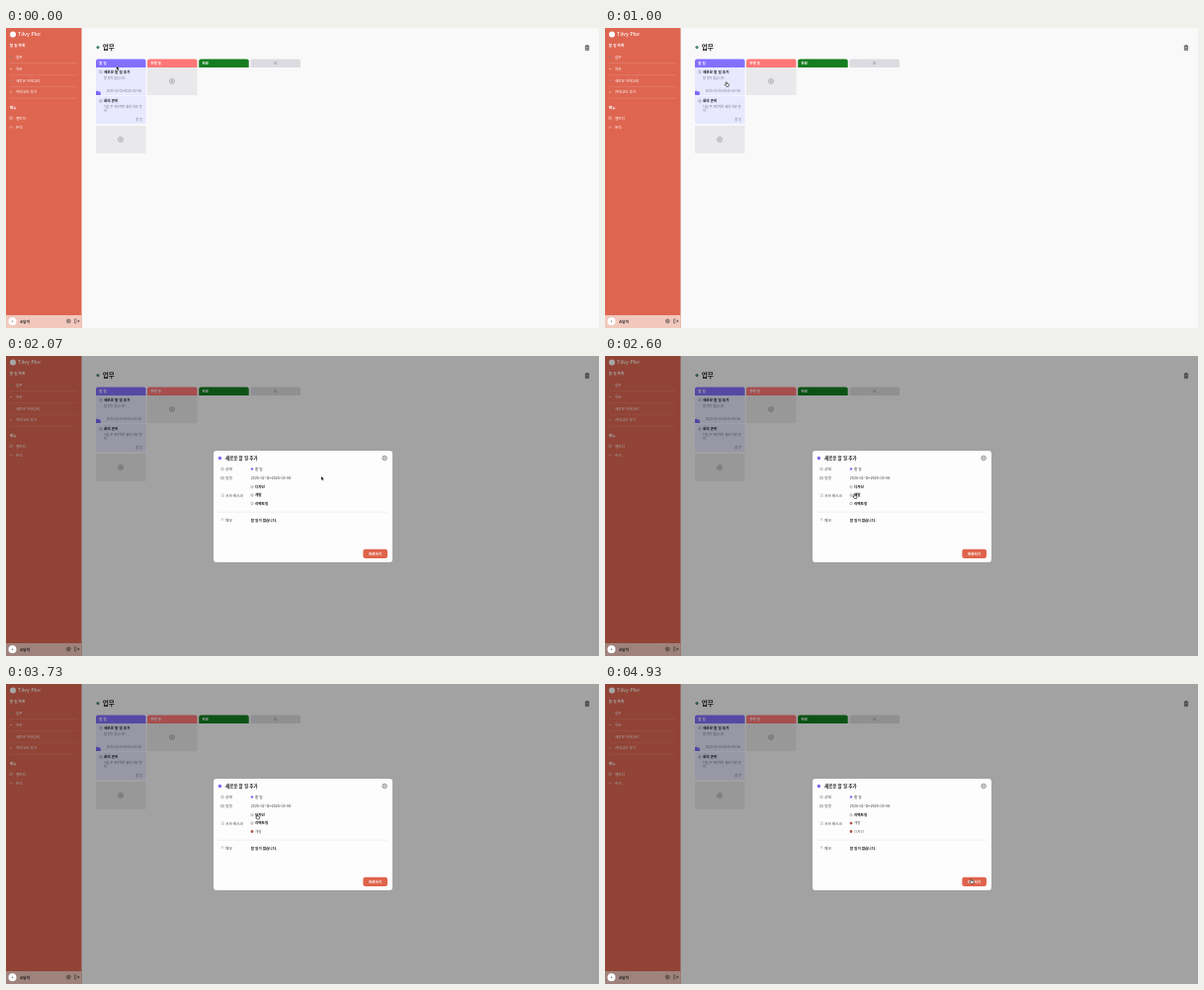
Write an HTML page that moves like this. It is 600x304 px and loops after 5000 ms.

```html
<!DOCTYPE html>
<html lang="ko">
<head>
<meta charset="utf-8">
<style>
html, body { margin: 0; width: 100%; height: 100%; overflow: hidden; }
svg {
  display: block; width: 600px; height: 304px;
  font-family: "Noto Sans CJK KR", "Noto Sans CJK", sans-serif;
}
text { white-space: pre; }
.latin { font-family: Inter, sans-serif; }
.ring { fill: none; stroke-width: .5; }
</style>
</head>
<body>
<svg id="stage" viewBox="0 0 600 304"></svg>
<script>
const stage = document.getElementById('stage');
const INK = '#1c1c20', GRAY = '#777780', LABEL = '#44444c', CORAL = '#e0644c', PURPLE = '#7c68fa';
const WHITE = '#fff', CARD = '#e8e8ff', TILE = '#e9e9eb';

const rect = (x, y, w, h, fill, r = 0) =>
  `<rect x="${x}" y="${y}" width="${w}" height="${h}" rx="${r}" fill="${fill}"/>`;
const dot = (x, y, r, fill) => `<circle cx="${x}" cy="${y}" r="${r}" fill="${fill}"/>`;
const ring = (x, y, r, color) => `<circle class="ring" cx="${x}" cy="${y}" r="${r}" stroke="${color}"/>`;
const path = (d, color, w = .5, fill = 'none') =>
  `<path d="${d}" fill="${fill}" stroke="${color}" stroke-width="${w}"/>`;
const text = (x, y, str, fill = INK, size = 3.65, weight = 500) =>
  `<text x="${x}" y="${y}" fill="${fill}" font-size="${size}" font-weight="${weight}">${str}</text>`;
const latin = (...args) => `<g class="latin">${text(...args)}</g>`;
const plus = (x, y, r, color) => ring(x, y, r, color) +
  path(`M${x - r / 2} ${y}h${r}M${x} ${y - r / 2}v${r}`, color);
const header = (x, color, label) =>
  path(`M${x} 40v-6.5q0-2 2-2h46.5q2 0 2 2v6.5z`, 'none', 0, color) +
  text(x + 3.3, 36.9, label, WHITE, 3.5, 700);
const addTile = (x, y) => rect(x, y, 50.5, 28, TILE, 1) + plus(x + 25, y + 14, 2.5, GRAY);

function sidebar() {
  const items = [['업무', 29.3, '#6f8a7a'], ['약속', 41.5, '#f3c4ba'], ['새로운 카테고리', 53.2, '#9a8a98'], ['카테고리 추가', 65]];
  return rect(0, 0, 76.5, 304, '#de6651') +
    dot(7, 6.5, 3, WHITE) + latin(12, 8.3, 'Tilvy Plor', WHITE, 5.2) +
    text(3.8, 19.2, '할 일 목록', WHITE, 3.65, 700) +
    items.map(([name, y, color]) =>
      (color ? dot(5, y, .8, color) : path(`M4.2 ${y}h1.6M5 ${y - .8}v1.6`, WHITE, .35)) +
      text(10, y + 1.4, name, WHITE) +
      path(`M4 ${y + 6.2}H72`, '#e8907f', .4)).join('') +
    text(3.8, 81.8, '메뉴', WHITE, 3.65, 700) +
    path('M3.8 90h2.6v2.6h-2.6zM3.8 91h2.6M3.8 101.5v-1.2M5 101.5v-2.2M6.2 101.5v-1.6', WHITE, .3) +
    text(10, 92.6, '캘린더', WHITE) + text(10, 101.7, '분석', WHITE) +
    rect(0, 291, 76.5, 13, '#f2c8bc') +
    text(14, 298.6, '소담이', INK, 3.65, 700) +
    ring(63.3, 297, 1.9, INK) + ring(63.3, 297, .7, INK) +
    path('M71.3 295h-1.6v4h1.6M71.2 297h3M73 295.8l1.2 1.2-1.2 1.2', INK);
}

function board() {
  return dot(93, 19.6, 1.6, '#4d8875') + text(97.8, 22.1, '업무', INK, 6.6, 700) +
    path('M585.8 18.4h4.4M587.2 18.2v-.8h1.6v.8M586.4 18.6v3.8h3.2v-3.8M587.5 19.4v2.2M588.5 19.4v2.2', INK, .6) +
    header(91, '#8470ff', '할 일') + header(143, '#ff7777', '진행 중') +
    header(195.2, '#147d20', '완료') + header(247.5, '#dcdce0', '') +
    plus(272.6, 35.6, 1.3, '#9a9aa2') +
    rect(91, 40, 50.5, 28.3, CARD) + rect(91, 69.3, 50.5, 28, CARD, 1) +
    ring(95.9, 44.5, 1.3, GRAY) + text(99, 45.9, '새로운 할 일 추가', INK, 3.65, 700) +
    text(99, 51.6, '할 일이 없습니다.', GRAY, 3.1) +
    latin(101.8, 64.9, '2025-02-12~2025-03-06', GRAY, 2.9, 400) +
    rect(91, 63.7, 2.5, 2, PURPLE, .5) + rect(91, 64.4, 4.8, 3.6, PURPLE, .5) +
    ring(95.9, 74, 1.3, GRAY) + text(99, 75.3, '회의 준비', INK, 3.65, 700) +
    text(99, 80.9, '다음 주 프로젝트 회의 자료 준', GRAY, 3.1) + text(99, 85.4, '비', GRAY, 3.1) +
    text(131.2, 94.2, '할 일', GRAY, 3.1) +
    addTile(91, 99) + addTile(143, 40);
}

function modal() {
  return rect(210, 96, 181, 113, '#fdfdfe', 3) +
    dot(216.4, 103.5, 1.7, PURPLE) + text(221.9, 105.1, '새로운 할 일 추가', INK, 4.5, 700) +
    ring(383.1, 103.4, 2.2, INK) + path('M382.3 102.6l1.6 1.6M383.9 102.6l-1.6 1.6', INK) +
    ring(219, 114.5, 1.3, GRAY) + text(222.1, 115.9, '상태', LABEL) +
    path('M217.6 122.4h2.8v2.7h-2.8zM217.6 123.4h2.8', GRAY, .4) + text(222.1, 125.1, '일정', LABEL) +
    path('M217.6 140h.8M219 140h1.6M217.6 141.2h.8M219 141.2h1.6M217.6 142.4h.8M219 142.4h1.6', GRAY, .4) +
    text(222.1, 142.6, '서브 태스크', LABEL) +
    path('M217.7 165h2.6M218.2 166.2h1.6', GRAY, .4) + text(222.1, 167.5, '메모', LABEL) +
    dot(249, 114.5, 1.2, PURPLE) + text(251.9, 115.9, '할 일', '#333338') +
    latin(247.8, 125.1, '2025-02-12~2025-03-06', '#333338', 3.35, 400) +
    `<g id="tasks"></g>` +
    path('M215 158.2H386', '#dcdce6', .5) +
    text(247.8, 167.5, '할 일이 없습니다.', INK, 3.6, 700) +
    rect(361.3, 195.8, 24.7, 9.2, CORAL, 2.2) + text(366.9, 201.7, '완료하기', WHITE, 3.6, 700);
}

const task = ([name, checked], i) => {
  const y = 132.7 + i * 8.4;
  return (checked ? dot(249, y, 1.4, '#a9574c') : ring(249, y, 1.2, GRAY)) +
    text(251.9, y + 1.35, name, checked ? '#66666c' : INK, 3.65, checked ? 400 : 700);
};

stage.innerHTML = rect(0, 0, 600, 304, '#f9f9fa') + board() + sidebar() +
  `<g id="popup">${rect(0, 0, 600, 304, 'rgba(0,0,0,.35)')}${modal()}</g>` +
  dot(6.5, 297.2, 4, WHITE) + dot(6.5, 297.2, .8, GRAY) +
  `<g id="cursor">
    <path id="arrow" d="M0 0v4.1l1-.9.7 1.5.7-.3-.7-1.5h1.4z" fill="#000" stroke="#fff" stroke-width=".3"/>
    <path id="hand" d="M-.5 2.3V.4q.5-.8 1 0v1.3l1.7.4q.5.2.4.8l-.4 1.8H0l-1.5-1.9q0-.8 1 .2z" fill="#fff" stroke="#111" stroke-width=".6"/>
  </g>`;
const [popup, tasks, cursor, arrow, hand] =
  ['popup', 'tasks', 'cursor', 'arrow', 'hand'].map(id => document.getElementById(id));

const OPEN = 1260, FIRST = 3260, SECOND = 4130, LOOP = 5000, STEP = 1000 / 15;
// time, x, y of the pointer tip
const route = [
  [0, 111.8, 38.5], [530, 117, 48], [1000, 122.8, 54.6], [1400, 122.8, 54.6],
  [1730, 306, 116], [1870, 308, 117], [2060, 319, 121.8], [2330, 254, 139.2],
  [2600, 252.3, 139.8], [3270, 252.3, 139.8], [3660, 254, 132.2],
  [4330, 254, 132.2], [4800, 370.5, 197.6], [LOOP, 370.5, 197.6]
];

function pointer(t) {
  const i = route.findIndex(p => p[0] > t);
  const [t0, x0, y0] = route[i - 1], [t1, x1, y1] = route[i];
  const u = (t - t0) / (t1 - t0), e = u * u * (3 - 2 * u);
  return [x0 + (x1 - x0) * e, y0 + (y1 - y0) * e];
}

function draw(now) {
  const t = Math.floor((now % LOOP + 1) / STEP) * STEP % LOOP;
  const open = t >= OPEN;
  popup.style.display = open ? '' : 'none';

  const list = t < FIRST ? [['디자인'], ['개발'], ['리팩토링']]
    : t < SECOND ? [['디자인'], ['리팩토링'], ['개발', true]]
    : [['리팩토링'], ['개발', true], ['디자인', true]];
  tasks.innerHTML = list.map(task).join('');

  const [x, y] = pointer(t);
  const clickable = open
    ? (x < 266 && x > 247 && y > 129) || (x > 361 && y > 195)
    : y > 40;
  cursor.setAttribute('transform', `translate(${x} ${y})`);
  arrow.style.display = clickable ? 'none' : '';
  hand.style.display = clickable ? '' : 'none';
}

const start = performance.now();
function tick() {
  draw(performance.now() - start);
  requestAnimationFrame(tick);
}
tick();
</script>
</body>
</html>
```
